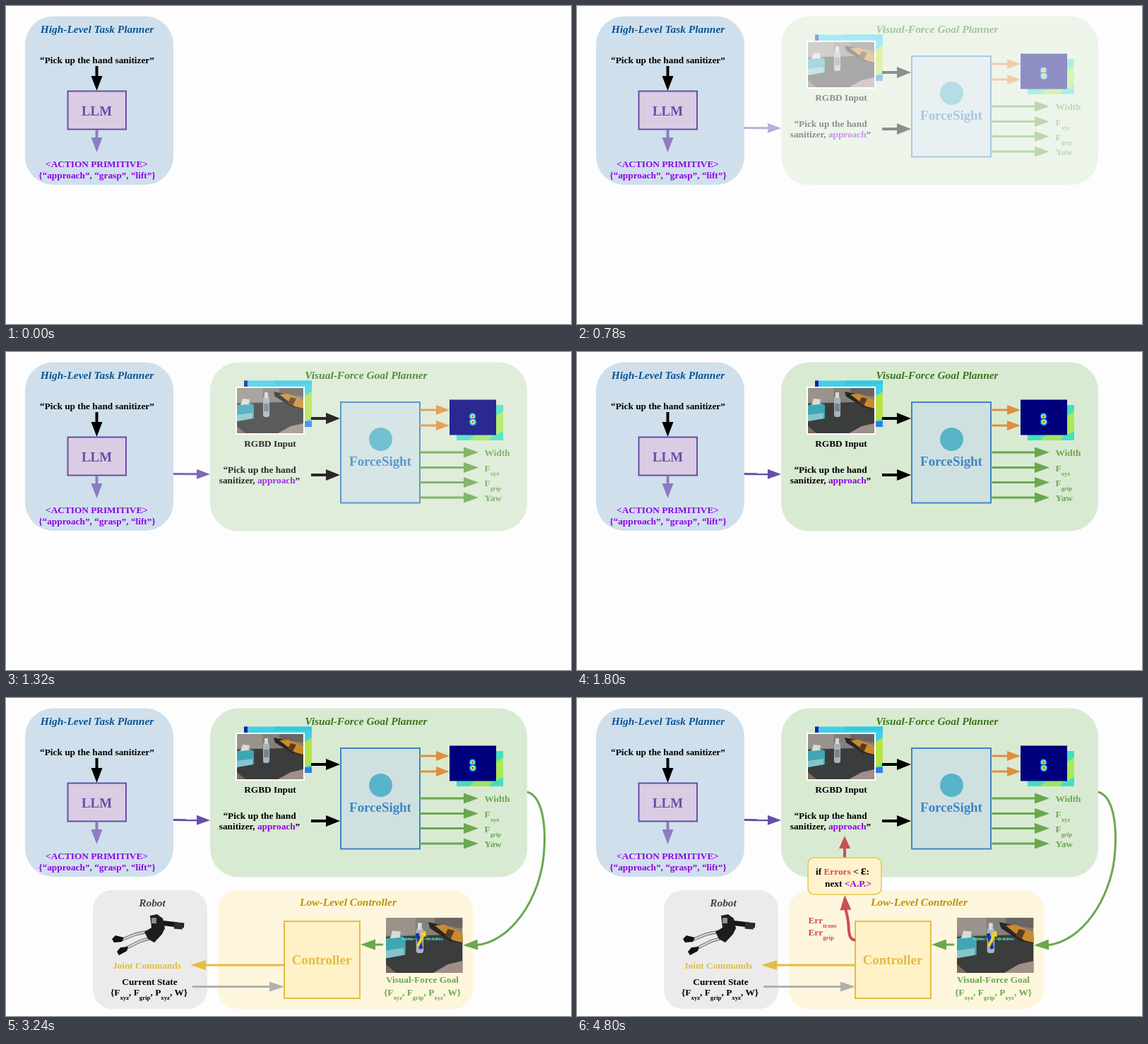
Animation, 800 px wide and 450 px high, one loop 5.16 s. Source, as an HTML page:

```html
<!DOCTYPE html>
<html lang="en">
<head>
<meta charset="utf-8">
<title>Planner and controller diagram</title>
<style>
html, body { margin: 0; width: 100%; height: 100%; overflow: hidden; background: #fdfdfe; }
svg { display: block; width: 800px; height: 450px; font: bold 13.3px "Liberation Serif", serif; }
.title { font-size: 15.45px; font-style: italic; }
.big { font-size: 18.9px; }
.mid { text-anchor: middle; }
</style>
</head>
<body>
<svg id="stage" viewBox="0 0 800 450"></svg>
<script>
const LOOP = 5160, STEP = 60;
const GREEN = '#6aa84f', YELLOW = '#e3bd40', RED = '#cc4e55', BLUE = '#3d85c6',
      VIOLET = '#674ea7', LILAC = '#8e7cc3', PURPLE = '#9000ea', ORANGE = '#e08e3e', GREY = '#b0b0b0';

const box = (x, y, x2, y2, fill, r = 0, stroke = 'none', w = 2) =>
  `<rect x="${x}" y="${y}" width="${x2 - x}" height="${y2 - y}" rx="${r}" fill="${fill}" stroke="${stroke}" stroke-width="${w}"/>`;

// "_abc" inside a string becomes a subscript
const text = (x, y, str, fill = '#000', cls = 'mid') =>
  `<text x="${x}" y="${y}" fill="${fill}" class="${cls}">` +
  str.replace(/_(\w+)/g, '<tspan font-size="8.8" baseline-shift="-5.5">$1</tspan>') + '</text>';

const tint = (str, fill) => `<tspan fill="${fill}">${str}</tspan>`;
const line = (d, color, w) => `<path d="${d}" fill="none" stroke="${color}" stroke-width="${w}"/>`;
const shape = (d, fill) => `<path d="${d}" fill="${fill}"/>`;
const dot = (x, y, rx, ry, fill) => `<ellipse cx="${x}" cy="${y}" rx="${rx}" ry="${ry}" fill="${fill}"/>`;

function head(x, y, angle, color, len = 21, half = 7.5) {
  return `<path transform="translate(${x} ${y}) rotate(${angle})" d="M0,0L${-len},${-half}V${half}Z" fill="${color}"/>`;
}

function arrow(x, y, x2, y2, color, w = 3, len = 21, half = 7.5) {
  const a = Math.atan2(y2 - y, x2 - x);
  const ex = x2 - Math.cos(a) * (len - 1), ey = y2 - Math.sin(a) * (len - 1);
  return line(`M${x},${y}L${ex},${ey}`, color, w) + head(x2, y2, a * 180 / Math.PI, color, len, half);
}

// Desk scene, drawn on a 94 by 64 area
const scene = (x, y, w, h) => `<svg x="${x}" y="${y}" width="${w}" height="${h}" viewBox="0 0 94 64" preserveAspectRatio="none">` +
  box(0, 0, 94, 64, '#85807a') +
  shape('M0,0H36V20H0Z', '#9a938c') + shape('M60,0H94V12L60,8Z', '#6c6460') +
  shape('M0,22L94,19V64H0Z', '#3b3d3d') +
  shape('M0,54L12,64H0Z', '#7d6a5b') + shape('M58,64L76,54L94,50V64Z', '#a08e88') +
  shape('M0,24L18,21L24,24V43L0,47Z', '#3fa6b4') + shape('M0,38L22,35V43L0,47Z', '#85c5c9') +
  shape('M5,24L8,15L18,16L17,23Z', '#dcdad4') +
  shape('M52,5L66,8L84,20L94,22V30L78,27L54,12Z', '#282624') +
  shape('M60,9L72,8L94,17V29L82,26Z', '#c98a2e') + shape('M76,13L84,15L79,25L72,21Z', '#5a3b20') +
  box(37, 12, 46, 41, '#a9b4ba', 3) + box(39, 6, 44, 14, '#d3d9db', 1) + box(38, 22, 45, 33, '#73848f', 1) +
  '</svg>';

const spot = (x, y, r) => dot(x, y, r, r, '#0a4cff') + dot(x, y, r * .75, r * .75, '#2ee6d0') +
  dot(x, y, r * .5, r * .5, '#ffe135') + dot(x, y, r * .24, r * .24, '#e02a10');

const task = box(27, 14.5, 237, 253, '#cfe0ec', 40) +
  text(129, 38, 'High-Level Task Planner', '#0b5394', 'mid title') +
  text(129, 80.5, '“Pick up the hand sanitizer”') +
  arrow(128.5, 85, 128.5, 120, '#000', 4, 21, 8) +
  box(87.5, 120.5, 170, 174.5, '#d9cce3', 0, VIOLET) +
  text(128.5, 154.5, 'LLM', VIOLET, 'mid big') +
  arrow(128.5, 175, 128.5, 207, LILAC, 4, 21, 8) +
  text(128.5, 227.5, '&lt;ACTION PRIMITIVE&gt;', PURPLE) +
  text(129, 243.5, '{“approach”, “grasp”, “lift”}', PURPLE);

const goal = arrow(237, 172.5, 289, 173, VIOLET, 3, 19, 7) +
  box(289, 14.5, 738, 253.5, '#d9ead3', 40) +
  text(510, 38, 'Visual-Force Goal Planner', '#38761d', 'mid title') +
  box(337, 40.5, 433, 106, '#3fd0e8') + box(337, 40.5, 342, 50, '#1420a8') +
  box(380, 40.5, 433, 46, '#35c9dc') + shape('M423,62L433,56V94L423,98Z', '#b6e34a') + box(423, 98, 433, 106, '#2f7fe8') +
  box(325, 49, 423, 117, '#fff') + scene(327, 51, 94, 64) +
  text(374, 133.5, 'RGBD Input') +
  text(359, 171, '“Pick up the hand') +
  text(359, 186, 'sanitizer, ' + tint('approach', PURPLE) + '”') +
  [94, 174].map(y => arrow(432, y, 473, y, '#000', 4, 20, 8)).join('') +
  box(474, 71, 586, 213.5, '#cfe0e1', 0, BLUE) +
  dot(530.5, 123.5, 16.5, 16.5, '#58b4c8') +
  text(530, 161, 'ForceSight', BLUE, 'mid big') +
  [82, 104].map(y => arrow(586, y, 628, y, ORANGE, 3, 19, 7)).join('') +
  [142, 163.5, 184.5, 206].map(y => arrow(586, y, 669, y, GREEN)).join('') +
  box(638, 75, 704, 125, '#45dfc0') + shape('M694,90L704,84V112L694,117Z', '#a8ea58') + shape('M656,125L664,117H690L684,125Z', '#9be661') +
  box(628, 67.5, 694, 117.5, '#00007c') + spot(660.5, 91, 5) + spot(661, 99, 5.5) +
  ['Width', 'F_xyz', 'F_grip', 'Yaw'].map((s, i) => text(677.5, [147, 169, 190, 210.5][i], s, GREEN, '')).join('');

const gripper = line('M252,322L218,318', '#151517', 7) + line('M250,323L238,322', '#2c2c30', 9) +
  line('M204,330L184,334L164,342M207,339L190,344L168,355', '#77777b', 4.5) +
  line('M204,330L184,334L164,342M207,339L190,344L168,355', '#dcdcde', 2) +
  shape('M204,308L214,306L222,312L225,326L221,334L210,346L201,341L196,331L206,325Z', '#1d1d20') +
  box(206, 311, 213, 319, '#8d8d93', 1) +
  shape('M150,341L155,336L167,339L164,345L153,346Z', '#111') +
  shape('M157,359L162,353L173,352L171,358L160,364Z', '#111');

const control = line('M738,133C760,139 765,182 761.5,221C756,285 714,345 667,349.5', GREEN, 3) +
  box(123, 272, 285, 440, '#ebebeb', 27) + box(300, 272.5, 661, 440, '#fef6dc', 27) +
  text(207, 294.5, 'Robot', '#434343', 'mid title') +
  text(484.5, 294, 'Low-Level Controller', '#bf9000', 'mid title') +
  gripper +
  text(199.5, 383, 'Joint Commands', YELLOW) +
  text(203.5, 406, 'Current State') +
  text(148, 421, '{F_xyz, F_grip, P_xyz, W}', '#000', '') +
  box(394, 316, 501, 425, '#fff1c8', 0, YELLOW) +
  text(447, 377, 'Controller', YELLOW, 'mid big') +
  arrow(394, 378, 261, 378, YELLOW, 3, 22, 7) +
  arrow(264, 408.5, 394, 408.5, GREY, 3, 21, 7) +
  scene(538, 311, 108.5, 78) +
  line('M560,341H612', '#49d878', 1.2) + line('M582,333L588,355', '#1530b8', 5) +
  line('M583,351L592,333', '#f0d321', 4) + head(594, 329, -63, '#f0d321', 8, 5) +
  `<g font-family="'Liberation Sans', sans-serif" font-size="5.5">${text(561, 343, '0.24m', '#4ce4d8', '')}${text(596, 343, 'D: 0.24m', '#4ce4d8', '')}</g>` +
  head(647, 350, 177, GREEN) + arrow(534, 349, 502, 349, GREEN) +
  text(589.5, 403, 'Visual-Force Goal', GREEN) +
  text(535, 421, '{F_xyz, F_grip, P_xyz, W}', GREEN, '');

const errors = line('M394,342.5C386,342 385,334 384.5,323C384,312 382,305 380,298', RED, 4) +
  head(379, 279, -94, RED, 21, 8) +
  arrow(379, 226, 379, 195, RED, 4, 18, 8) +
  box(327, 226, 431, 278, '#fff2cc', 9, '#e6c650', 1.5) +
  text(338, 250, `if ${tint('Errors', '#d9484e')} &lt; <tspan font-size="18">ε</tspan>:`, '#000', '') +
  text(351, 267, 'next ' + tint('&lt;A.P.&gt;', PURPLE), '#000', '') +
  text(327.5, 318.5, 'Err_trans', RED, '') + text(327.5, 335.5, 'Err_grip', RED, '');

// Each layer fades in linearly between its two times
const layers = [[task, -1, 0], [goal, 186, 1536], [control, 2050, 2440], [errors, 3620, 4680]];
const stage = document.getElementById('stage');
stage.innerHTML = layers.map(([art]) => `<g>${art}</g>`).join('');
const groups = [...stage.children];

function draw(now) {
  const t = Math.floor(now % LOOP / STEP) * STEP;
  layers.forEach(([, from, to], i) =>
    groups[i].setAttribute('opacity', Math.min(1, Math.max(0, (t - from) / (to - from)))));
}

const start = performance.now();
function tick() {
  draw(performance.now() - start);
  requestAnimationFrame(tick);
}
tick();
</script>
</body>
</html>
```
